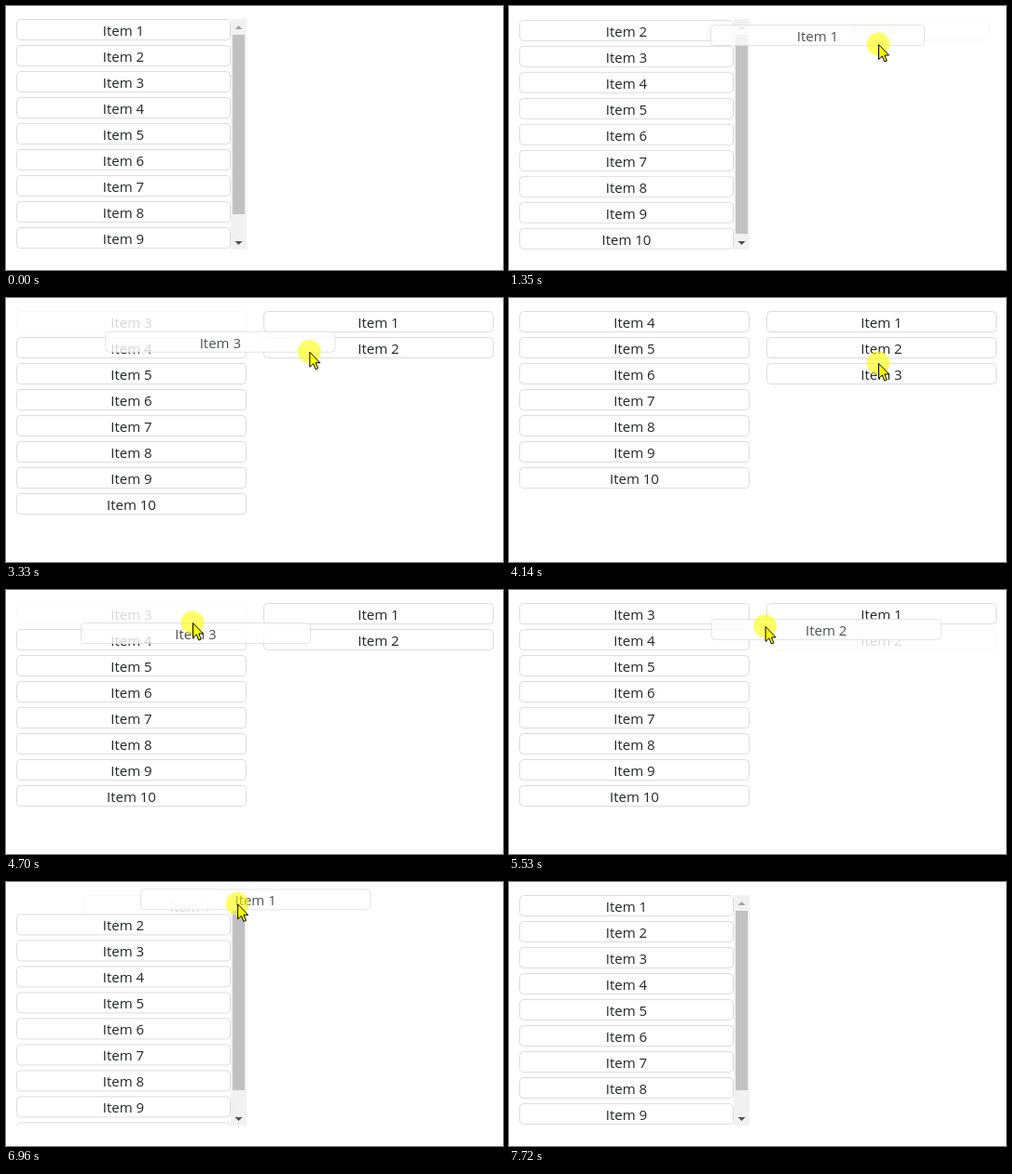
These frames come from a looping animation (533 px wide and 284 px high, 8120 ms). An HTML page with a canvas:

```html
<!DOCTYPE html>
<html lang="en">
<head>
<meta charset="utf-8">
<title>Drag between lists</title>
<style>
html, body { margin: 0; width: 100%; height: 100%; overflow: hidden; background: #fff; }
canvas { display: block; }
</style>
</head>
<body>
<canvas id="stage" width="533" height="284"></canvas>
<script>
const ctx = document.getElementById('stage').getContext('2d');
const LOOP = 8120, FLIP = 150, COUNT = 10, ENTER = 70, EXIT = 7710;
const LEFT = 11, RIGHT = 276, TOP = 14, ROW = 28, WIDE = 247, NARROW = 230, ITEM_H = 23, LIST_H = 248;

// Pointer path: arrival time, x, y, optional rest
const path = [
  [ENTER, 461, 247], [500, 334, 125], [870, 191, 35, 90],
  [1238, 290, 39], [1350, 396, 41, 80], [1760, 195, 33], [1820, 213, 36, 240],
  [2359, 300, 50], [2430, 378, 60], [2530, 400, 62], [2900, 214, 32], [2970, 230, 36, 210],
  [3500, 432, 82, 140], [3810, 396, 70, 370], [4600, 200, 35, 190],
  [5130, 334, 50, 200], [5530, 275, 39], [5750, 200, 23, 130],
  [6300, 374, 40, 70], [6450, 380, 30, 130], [7100, 200, 21, 210],
  [7550, 385, 35], [EXIT, 540, 50]
];

// Items 1 to 3 go right, then return in reverse order
const drags = [
  { item: 1, press: 870, start: 960, swap: 1238, drop: 1420 },
  { item: 2, press: 2020, start: 2060, swap: 2359, drop: 2520 },
  { item: 3, press: 3120, start: 3180, swap: 3400, drop: 3620 },
  { item: 3, press: 3950, start: 4180, swap: 4450, drop: 4780, back: true },
  { item: 2, press: 5180, start: 5330, swap: 5600, drop: 5850, back: true },
  { item: 1, press: 6500, start: 6580, swap: 6900, drop: 7310, back: true }
];

const lerp = (a, b, p) => a + (b - a) * p;
const clamp = p => Math.min(1, Math.max(0, p));
const easeOut = p => 1 - (1 - clamp(p)) ** 2.5;

// first: number of the item at the top of the left list
const scrolls = first => first <= 2;
const widthOf = (item, first) => item >= first && scrolls(first) ? NARROW : WIDE;

function slot(item, first) {
  return item >= first
    ? { x: LEFT, y: TOP + (item - first) * ROW }
    : { x: RIGHT, y: TOP + (item - 1) * ROW };
}

function pointerAt(t) {
  const i = Math.max(1, path.findIndex(([time]) => time >= t));
  const [t0, x0, y0, rest = 0] = path[i - 1], [t1, x1, y1] = path[i];
  const p = clamp((t - t0 - rest) / (t1 - t0 - rest));
  return { x: lerp(x0, x1, p), y: lerp(y0, y1, p) };
}

function drawItem(item, x, y, w, alpha) {
  ctx.globalAlpha = alpha;
  ctx.beginPath();
  ctx.roundRect(x + .5, y + .5, w - 1, ITEM_H - 1, 4);
  ctx.fillStyle = '#fff';
  ctx.fill();
  ctx.strokeStyle = '#dcdcdc';
  ctx.stroke();
  ctx.fillStyle = '#212529';
  ctx.fillText('Item ' + item, x + w / 2, y + 18);
  ctx.globalAlpha = 1;
}

function fillArrow(base, tip, color) {
  ctx.fillStyle = color;
  ctx.beginPath();
  ctx.moveTo(245.5, base);
  ctx.lineTo(249.5, tip);
  ctx.lineTo(253.5, base);
  ctx.fill();
}

function drawScrollbar(first) {
  ctx.fillStyle = '#f1f1f1';
  ctx.fillRect(241, TOP, 17, LIST_H);
  ctx.fillStyle = '#c1c1c1';
  ctx.fillRect(243, 31, 13, first === 1 ? 193 : 214);
  fillArrow(25, 21, '#a3a3a3');
  fillArrow(253, 257, '#505050');
}

function drawList(left, first, prev, p, held) {
  ctx.save();
  ctx.beginPath();
  ctx.rect(left, TOP, WIDE, LIST_H);
  ctx.clip();
  for (let item = 1; item <= COUNT; item++) {
    const to = slot(item, first), old = slot(item, prev);
    if (to.x !== left) continue;
    drawItem(item, lerp(old.x, to.x, p), lerp(old.y, to.y, p), widthOf(item, first), item === held ? .18 : 1);
  }
  ctx.restore();
}

const arrow = new Path2D('M0 0V16L3.8 12.5 6.3 18.5 8.8 17.5 6.3 11.5H11Z');

function drawPointer({ x, y }, pressed) {
  if (pressed) {
    ctx.fillStyle = 'rgba(255,255,0,.6)';
    ctx.beginPath();
    ctx.arc(x, y, 12.5, 0, 2 * Math.PI);
    ctx.fill();
  }
  ctx.save();
  ctx.translate(x + .5, y + .5);
  ctx.fillStyle = '#ff0';
  ctx.fill(arrow);
  ctx.strokeStyle = '#000';
  ctx.stroke(arrow);
  ctx.restore();
}

function draw(t) {
  ctx.fillStyle = '#fff';
  ctx.fillRect(0, 0, 533, 284);
  ctx.font = '15px "Open Sans", sans-serif';
  ctx.textAlign = 'center';

  const drag = drags.filter(d => t >= d.press).pop();
  const pressed = drag && t < drag.drop;
  const dragging = pressed && t >= drag.start;
  let prev = 1, first = 1, p = 1;
  if (drag) {
    prev = drag.back ? drag.item + 1 : drag.item;
    first = t < drag.swap ? prev : drag.back ? prev - 1 : prev + 1;
    p = easeOut((t - drag.swap) / FLIP);
  }

  for (const left of [LEFT, RIGHT]) drawList(left, first, prev, p, dragging ? drag.item : 0);
  if (scrolls(first)) drawScrollbar(first);
  if (t < ENTER || t >= EXIT) return;

  const tip = pointerAt(t);
  if (dragging) {
    const grab = pointerAt(drag.press), home = slot(drag.item, prev);
    drawItem(drag.item, home.x + tip.x - grab.x, home.y + tip.y - grab.y, widthOf(drag.item, prev), .8);
  }
  drawPointer(tip, pressed);
}

const began = performance.now();
function tick() {
  draw((performance.now() - began) % LOOP);
  requestAnimationFrame(tick);
}
tick();
</script>
</body>
</html>
```
